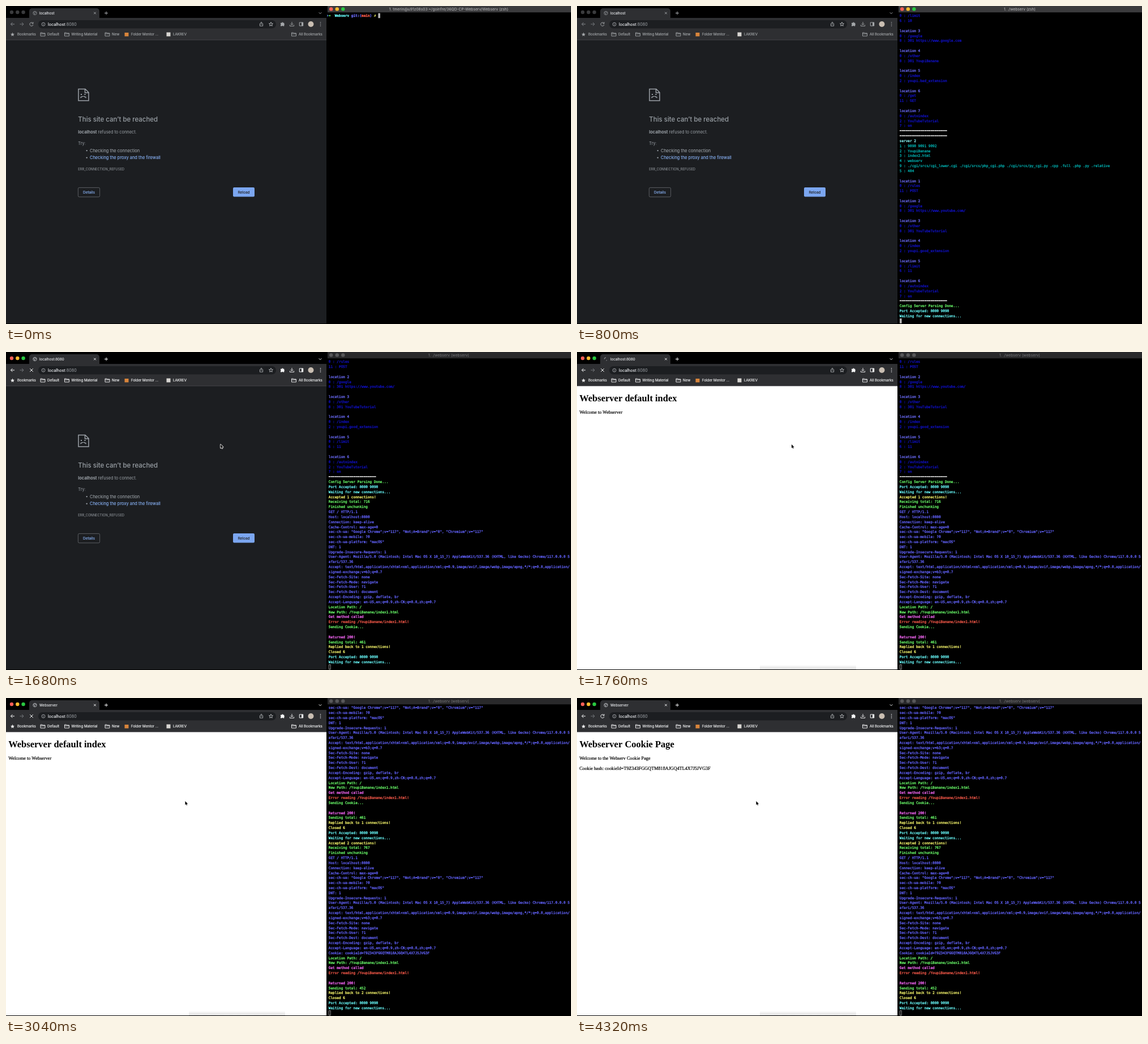
Recreate the animation shown at these times as an HTML page with a canvas. Size 998x561 px, loop 4.4 s.

```html
<!DOCTYPE html>
<html lang="en">
<head>
<meta charset="utf-8">
<title>Web server session</title>
<style>
html, body { margin: 0; width: 100%; height: 100%; overflow: hidden; background: #000; }
canvas { display: block; }
</style>
</head>
<body>
<canvas width="998" height="561"></canvas>
<script>
const ctx = document.querySelector('canvas').getContext('2d');
const LOOP = 4400, STEP = 80;
const SANS = 'Inter, sans-serif', SERIF = '"Liberation Serif", serif', MONO = '"DejaVu Sans Mono", monospace';
const ROW = 8.828, COL = 3.64, COLS = 117, ROWS = 61;
const BAR = '#2e2f32', PAGE_DARK = '#1c1e21';

// Key moments in ms
const RUN = 560, STARTED = 800, FOCUS = 1360, LOAD = 1600, REPLY = 1680, PAGE = 1760, LOADED = 1920;
const RELOAD = 2960, REPLY2 = 3040, PAGE2 = 3120, LOADED2 = 3280;

const INK = {
  n: '#1111c8', l: '#6e6eff', d: '#00b0b0', s: '#8effff', w: '#d4d4d4',
  g: '#6bff6b', c: '#6bffff', y: '#ffff70', b: '#6464ff', m: '#ff6bff', r: '#ff5c4c'
};

// The first letter of each line picks its colour.
const config = `n0 : /limit
n6 : 10

llocation 3
n0 : /google
n8 : 301 https://www.google.com

llocation 4
n0 : /other
n8 : 301 YoupiBanane

llocation 5
n0 : /index
n2 : youpi.bad_extension

llocation 6
n0 : /get
n11 : GET

llocation 7
n0 : /autoindex
n2 : YouTubeTutorial
n7 : on
w=======================
w=======================
sserver 2
d1 : 9090 9091 9092
d2 : YoupiBanane
d3 : index2.html
d4 : webserv
d9 : ./cgi/srcs/cgi_lower.cgi ./cgi/srcs/php_cgi.php ./cgi/srcs/py_cgi.py .cpp .full .php .py .relative
d5 : 404

llocation 1
n0 : /rules
n11 : POST

llocation 2
n0 : /google
n8 : 301 https://www.youtube.com/

llocation 3
n0 : /other
n8 : 301 YouTubeTutorial

llocation 4
n0 : /index
n2 : youpi.good_extension

llocation 5
n0 : /limit
n6 : 11

llocation 6
n0 : /autoindex
n2 : YouTubeTutorial
n7 : on
w=======================
gConfig Server Parsing Done...
cPort Accepted: 8080 9090
cWaiting for new connections...`;

const COOKIE = 'cookieId=T9Z343FGGQTM818AJGQ4TL4X7J5JVG3F';

const request = (count, received, sent, cookie) => `
yAccepted ${count} connections!
gReceiving total: ${received}
gFinished unchunking
bGET / HTTP/1.1
bHost: localhost:8080
bConnection: keep-alive
bCache-Control: max-age=0
bsec-ch-ua: "Google Chrome";v="117", "Not;A=Brand";v="8", "Chromium";v="117"
bsec-ch-ua-mobile: ?0
bsec-ch-ua-platform: "macOS"
bDNT: 1
bUpgrade-Insecure-Requests: 1
bUser-Agent: Mozilla/5.0 (Macintosh; Intel Mac OS X 10_15_7) AppleWebKit/537.36 (KHTML, like Gecko) Chrome/117.0.0.0 Safari/537.36
bAccept: text/html,application/xhtml+xml,application/xml;q=0.9,image/avif,image/webp,image/apng,*/*;q=0.8,application/signed-exchange;v=b3;q=0.7
bSec-Fetch-Site: none
bSec-Fetch-Mode: navigate
bSec-Fetch-User: ?1
bSec-Fetch-Dest: document
bAccept-Encoding: gzip, deflate, br
bAccept-Language: en-US,en;q=0.9,zh-CN;q=0.8,zh;q=0.7
${cookie ? 'bCookie: ' + COOKIE + '\n' : ''}gLocation Path: /
gNew Path: /YoupiBanane/index1.html
mGet method called
rError reading /YoupiBanane/index1.html!
${cookie ? '' : 'gSending Cookie...\n'}
mReturned 200!
gSending total: ${sent}
yReplied back to ${count} connections!
yClosed 6
cPort Accepted: 8080 9090
cWaiting for new connections...`;

const wrap = log => log.split('\n').flatMap(line =>
  (line.slice(1).match(new RegExp(`.{1,${COLS}}`, 'g')) || ['']).map(part => [INK[line[0]], part]));
const first = config + request(1, 716, 461, false);
const logs = [config, first, first + request(2, 767, 452, true)].map(log => wrap(log).slice(-ROWS));

// A thin outline (heavy) makes small type denser.
function text(s, x, y, size, color, { weight = 400, align = 'left', family = SANS, heavy = 0 } = {}) {
  ctx.font = `${weight} ${size}px ${family}`;
  ctx.textAlign = align;
  ctx.fillStyle = ctx.strokeStyle = color;
  ctx.fillText(s, x, y);
  if (!heavy) return;
  ctx.lineWidth = heavy;
  ctx.strokeText(s, x, y);
}

function box(x, y, w, h, color, radius = 0, outline = false) {
  ctx.beginPath();
  ctx.roundRect(x, y, w, h, radius);
  ctx[outline ? 'strokeStyle' : 'fillStyle'] = color;
  ctx.lineWidth = 0.8;
  outline ? ctx.stroke() : ctx.fill();
}

function dot(x, y, r, color) {
  ctx.beginPath();
  ctx.arc(x, y, r, 0, 7);
  ctx.fillStyle = color;
  ctx.fill();
}

function icon(d, x, y, color, fill = false, width = 1) {
  const path = new Path2D(d);
  ctx.save();
  ctx.translate(x, y);
  ctx.strokeStyle = ctx.fillStyle = color;
  ctx.lineWidth = width;
  fill ? ctx.fill(path) : ctx.stroke(path);
  ctx.restore();
}

const ICON = {
  back: 'M3.5 0H-3M0 -3L-3 0L0 3',
  forward: 'M-3.5 0H3M0 -3L3 0L0 3',
  reload: 'M2.6 -1.6A3.1 3.1 0 1 0 3 1M3 -3.6V-1H.4',
  cross: 'M-2.8 -2.8L2.8 2.8M2.8 -2.8L-2.8 2.8',
  close: 'M-1.8 -1.8L1.8 1.8M1.8 -1.8L-1.8 1.8',
  plus: 'M-3 0H3M0 -3V3',
  chevron: 'M-2.3 -1.2L0 1.2L2.3 -1.2',
  info: 'M3 0A3 3 0 1 1 -3 0A3 3 0 1 1 3 0M0 -.4V1.7M0 -1.8V-1',
  share: 'M-1.4 -1H-2.6V3.2H2.6V-1H1.4M0 1V-3.6M-1.5 -2.2L0 -3.7L1.5 -2.2',
  star: 'M0 -3.5L1 -1.1L3.5 -1L1.6 .7L2.2 3.2L0 1.9L-2.2 3.2L-1.6 .7L-3.5 -1L-1 -1.1Z',
  puzzle: 'M-3.5 -2.3H-1.2A1.1 1.1 0 0 1 1 -2.3H2.8V-.4A1.1 1.1 0 0 1 2.8 1.6V3.6H.8A1.1 1.1 0 0 0 -1.3 3.6H-3.5V1.5A1.1 1.1 0 0 0 -3.5 -.5Z',
  download: 'M0 -4V1M-2.3 -1L0 1.4L2.3 -1M-3.6 1.2V3.4H3.6V1.2',
  panel: 'M-3.2 -3H3.2V3H-3.2Z',
  folder: 'M-4 -3H-1L0 -2H4V3H-4ZM-4 -1H4',
  globe: 'M3.2 0A3.2 3.2 0 1 1 -3.2 0A3.2 3.2 0 1 1 3.2 0M-3 -1L0 .3L-.8 2.9M-1 -3L1 -1L3 -.6',
  spinner: 'M-2.7 0A2.7 2.7 0 0 1 0 -2.7M2 1.8A2.7 2.7 0 0 1 .6 2.6',
  arrow: 'M0 0V6.6L1.6 5.2L2.6 7.4L3.6 7L2.6 4.8H4.7Z',
  sadPage: 'M1 1H13L19 7V21.5H1ZM12.5 1V7.5H19'
};

function lights(xs, y, r, on, off) {
  xs.forEach((x, i) => dot(x, y, r, on ? ['#ff5f57', '#febc2e', '#28c840'][i] : off));
}

function drawToolbar(t, active) {
  const bright = active ? '#f6f7f8' : '#a4a7aa', dim = active ? '#b9bcc0' : '#85888c';
  const loading = (t >= LOAD && t < LOADED) || (t >= RELOAD && t < LOADED2);
  const spinning = (t >= PAGE && t < LOADED) || (t >= PAGE2 && t < LOADED2);
  box(0, 0, 566, 22, '#000');
  box(0, 21, 566, 39, BAR);
  box(41, 4, 124, 20, BAR, [5, 5, 0, 0]);
  box(0, 59.5, 566, 0.7, '#4a4b4e');
  lights([10, 20.3, 30.6], 11, 3.2, active, '#3a3b3d');

  icon(spinning ? ICON.spinner : ICON.globe, 51, 12.5, dim, false, 0.9);
  const title = t < LOAD ? 'localhost' : t < LOADED ? 'localhost:8080' : 'Webserver';
  text(title, 59, 14.8, 6.2, '#e4e6e9', { heavy: 0.15 });
  icon(ICON.close, 157, 12.5, bright);
  icon(ICON.plus, 177, 12.5, bright);
  icon(ICON.chevron, 555, 12.5, bright);

  icon(ICON.back, 11.5, 32, active ? bright : dim);
  icon(ICON.forward, 28, 32, '#75787c');
  icon(loading ? ICON.cross : ICON.reload, 45, 32, bright);
  box(57, 25, 420, 14.5, PAGE_DARK, 7.2);
  icon(ICON.info, 66, 32.2, '#b4b7bb', false, 0.8);
  text('localhost', 74, 34.9, 7.2, '#e8eaed', { heavy: 0.15 });
  text(':8080', 74 + ctx.measureText('localhost').width, 34.9, 7.2, '#a3a7ac');
  icon(ICON.share, 451, 32, '#c4c7ca', false, 0.8);
  icon(ICON.star, 468, 32, '#d4d6d9', false, 0.8);
  icon(ICON.puzzle, 488.5, 32, bright, true);
  icon(ICON.download, 505, 32, bright, false, 0.9);
  icon(ICON.panel, 521.5, 32, bright);
  box(522, 29, 3, 6, bright);
  dot(538.5, 32, 5, '#c9beb2');
  [-3, 0, 3].forEach(dy => dot(555.5, 32 + dy, 0.8, bright));

  icon(ICON.star, 11.5, 50, bright, true);
  [65, 107.5, 179, 508.5].forEach(x => icon(ICON.folder, x, 50, bright, false, 0.9));
  box(209.5, 47, 7, 6.5, '#d9853b');
  box(283.5, 46.5, 7, 7, '#d8d6d2');
  [['Bookmarks', 20], ['Default', 73], ['Writing Material', 115.5], ['New', 187],
   ['Folder Mentor ...', 221], ['LAKREV', 295], ['All Bookmarks', 517]]
    .forEach(([label, x]) => text(label, x, 52.4, 6.2, bright, { heavy: 0.15 }));
}

function drawErrorPage() {
  const gray = '#9aa0a6', blue = '#8ab4f8';
  box(0, 60, 566, 500, PAGE_DARK);
  icon(ICON.sadPage, 127, 145.5, gray, false, 1.5);
  box(132, 155, 2, 2, gray);
  box(138.5, 155, 2, 2, gray);
  icon('M5 17V15.2H7V14H12V15.2H14V17', 127, 145.5, gray, false, 1.2);
  text('This site can’t be reached', 127.3, 204.2, 11.45, gray, { weight: 500 });
  text('localhost', 127.3, 224.9, 7.4, gray, { weight: 700 });
  text(' refused to connect.', 127.3 + ctx.measureText('localhost').width, 224.9, 7.4, gray);
  text('Try:', 127.3, 244.9, 7.4, gray);
  [['Checking the connection', 254.9, gray], ['Checking the proxy and the firewall', 267.4, blue]]
    .forEach(([s, y, color]) => {
      dot(142.7, y + 0.2, 1.2, gray);
      text(s, 148, y + 2.7, 7.47, color, { heavy: 0.1 });
    });
  text('ERR_CONNECTION_REFUSED', 127.3, 289.8, 5.8, gray);
  box(127.4, 320.4, 38.2, 16.4, '#6a6e73', 2, true);
  text('Details', 146.4, 331.1, 6.5, blue, { align: 'center', heavy: 0.15 });
  box(401, 320, 38, 16.6, '#7ba6f0', 2);
  text('Reload', 420, 330.7, 6.5, '#202124', { align: 'center', heavy: 0.15 });
}

function drawSite(lines) {
  box(0, 60, 566, 500, '#fff');
  const shade = ctx.createLinearGradient(0, 552, 0, 560);
  shade.addColorStop(0, '#0000');
  shade.addColorStop(1, '#0002');
  box(323, 552, 170, 8, shade);
  text(lines[0], 4.2, 86.6, 16.5, '#000', { weight: 700, family: SERIF });
  lines.slice(1).forEach((s, i) =>
    text(s, 4.2, 109.3 + i * 17.8, 8.2, '#000', { family: SERIF, heavy: 0.2 }));
}

function drawPage(t) {
  if (t < PAGE) drawErrorPage();
  else if (t < PAGE2) drawSite(['Webserver default index', 'Welcome to Webserver']);
  else drawSite(['Webserver Cookie Page', 'Welcome to the Webserv Cookie Page', 'Cookie hash: ' + COOKIE]);
}

const term = (s, col, row, color, weight = 400) =>
  text(s, 569.8 + col * COL, Math.round(19.2 + row * ROW), 6.05, color, { weight, family: MONO, heavy: 0.3 });

function drawPrompt(t) {
  const typed = './webserv'.slice(0, Math.floor(t / 45));
  icon('M0 -2L2 0L0 2Z', 567.5, 17, '#5a9cff', true);
  [['➜', 0, INK.g], ['Webserv', 3, INK.c], ['git:(', 11, INK.l], ['main', 16, INK.r], [')', 20, INK.l], ['✗', 22, INK.y]]
    .forEach(([s, col, color]) => term(s, col, 0, color, 700));
  term(typed, 24, 0, '#d0d0d0');
  return t < RUN ? [24 + typed.length, 0] : [0, 1];
}

function drawTerminal(t, active) {
  box(566, 0, 432, 561, '#000');
  box(568, 0, 430, 11.2, active ? '#3b3b3d' : '#29292b');
  lights([574.2, 584.8, 595.3], 5.4, 3.2, active, '#58585a');
  const title = t < RUN ? '1. tmerin@u91z08s03:~/goinfre/36QD-CP-Webserv/Webserv (zsh)'
    : active ? '1. ./webserv (zsh)' : '1. ./webserv (webserv)';
  text(title, 782, 7.8, 6.7, active ? '#c2c2c4' : '#77777a', { align: 'center' });

  let caret = [0, ROWS];
  if (t < STARTED) caret = drawPrompt(t);
  else logs[t < REPLY ? 0 : t < REPLY2 ? 1 : 2].forEach(([color, s], row) => term(s, 0, row, color));
  const x = 570 + caret[0] * COL, y = 12.7 + caret[1] * ROW;
  if (active) box(x, y, COL, 8.6, '#b4b4b4');
  else box(x + 0.4, y + 0.4, COL - 0.8, 8, '#b4b4b4', 0, true);
}

// Smooth progress from time a to time b
function ease(t, a, b) {
  const p = Math.min(1, Math.max(0, (t - a) / (b - a)));
  return p * p * (3 - 2 * p);
}

function drawPointer(t) {
  if (t < FOCUS) return;
  const enter = 1 - ease(t, FOCUS - STEP, LOAD), move = ease(t, LOADED, 2320);
  const x = 379 + 150 * enter - 62.5 * move, y = 163 + 20 * enter + 19 * move;
  ctx.lineJoin = 'round';
  icon(ICON.arrow, x, y, '#fff', false, 1.5);
  icon(ICON.arrow, x, y, '#000', true);
  ctx.lineJoin = 'miter';
}

function draw(now) {
  const t = Math.floor(now % LOOP / STEP) * STEP;
  const browsing = t >= FOCUS;
  box(0, 0, 998, 561, '#000');
  drawPage(t);
  drawToolbar(t, browsing);
  drawTerminal(t, !browsing);
  drawPointer(t);
  requestAnimationFrame(() => draw(performance.now()));
}
draw(0);
</script>
</body>
</html>
```
